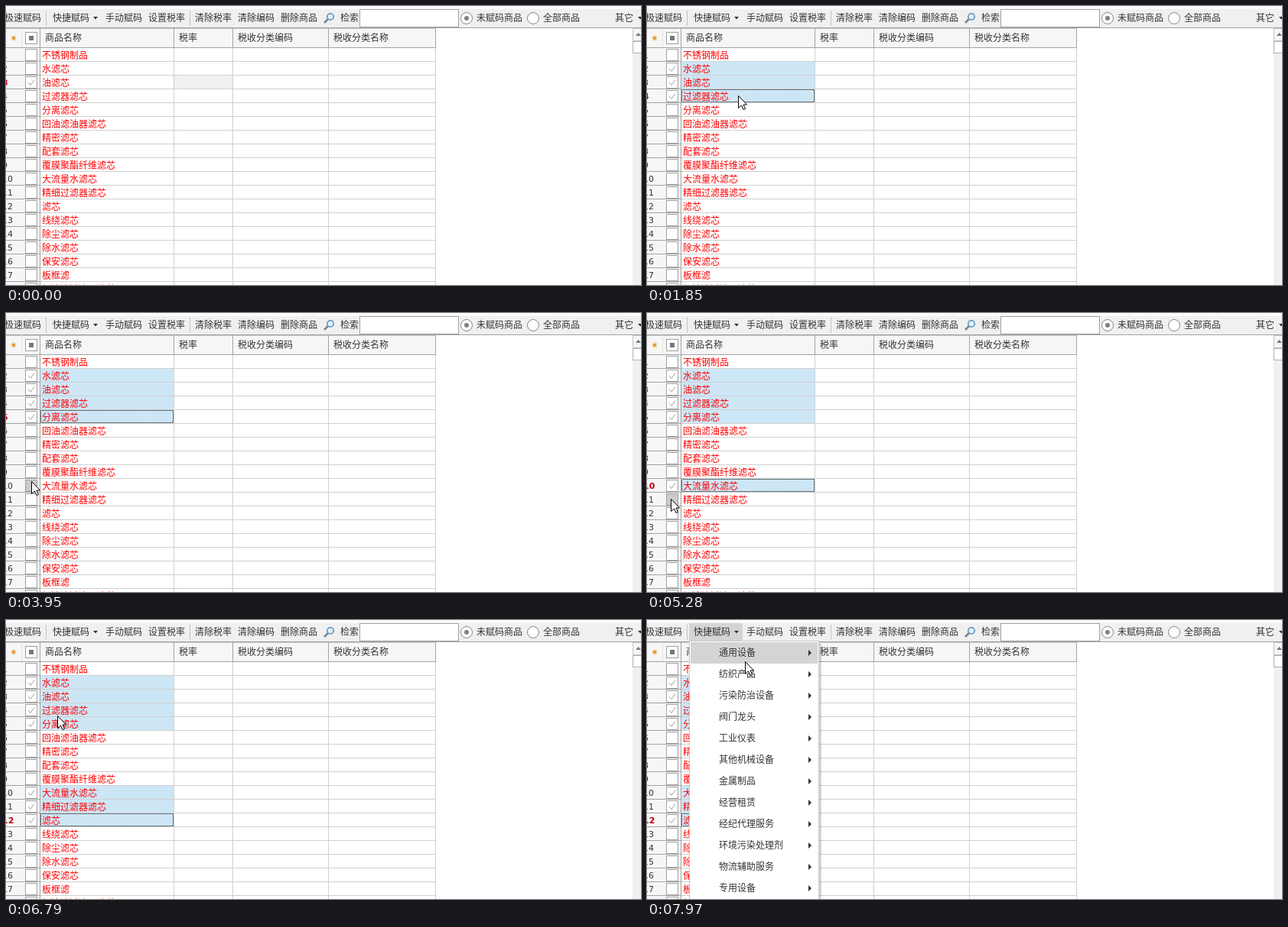
An HTML page with a canvas that plays this animation: 830x365 px, repeating every 8 s.

```html
<!DOCTYPE html>
<html lang="zh">
<head>
<meta charset="utf-8">
<style>
html, body { margin: 0; width: 100%; height: 100%; overflow: hidden; background: #fff; }
canvas { display: block; }
</style>
</head>
<body>
<canvas id="stage" width="830" height="365"></canvas>
<script>
const ctx = document.getElementById('stage').getContext('2d');
const LOOP = 8000, STEP = 70, ROW = 18, TOP = 55, RIGHT = 561;
const FONT = '12px "Noto Sans CJK SC", "Noto Sans CJK", sans-serif';
const LINE = '#d0d0d0', EDGE = '#a3a3a3', INK = '#333';

const products = ['不锈钢制品', '水滤芯', '油滤芯', '过滤器滤芯', '分离滤芯', '回油滤油器滤芯',
  '精密滤芯', '配套滤芯', '覆膜聚酯纤维滤芯', '大流量水滤芯', '精细过滤器滤芯', '滤芯',
  '线绕滤芯', '除尘滤芯', '除水滤芯', '保安滤芯', '板框滤', '机油滤过滤器滤芯'];
const menu = ['通用设备', '纺织产品', '污染防治设备', '阀门龙头', '工业仪表', '其他机械设备',
  '金属制品', '经营租赁', '经纪代理服务', '环境污染处理剂', '物流辅助服务', '专用设备'];
const columns = { 商品名称: 44, 税率: 219, 税收分类编码: 296, 税收分类名称: 421 };
const tools = { 极速赋码: -2, 快捷赋码: 61, 手动赋码: 130, 设置税率: 186, 清除税率: 247,
  清除编码: 303, 删除商品: 359, 检索: 437, 未赋码商品: 615, 全部商品: 702, 其它: 796 };

// Pointer moves: start, end, x, y
const moves = [
  [130, 900, 112, 105],
  [970, 1310, 121, 87],
  [1510, 2130, 118, 147],
  [2460, 2670, 45, 199],
  [2740, 2810, 33, 220],
  [4870, 5280, 31, 246],
  [5630, 6040, 30, 262],
  [6300, 6790, 67, 125],
  [6860, 7070, 92, 34],
  [7140, 7400, 100, 14],
  [7470, 7970, 129, 55]
];
const DRAG = 1510, CLICKS = [4870, 5630, 6300], OPEN = 7440;

function pointer(t) {
  let x = 795, y = 382;
  for (const [start, end, toX, toY] of moves) {
    if (t < start) break;
    const u = Math.min(1, (Math.floor((t - start) / STEP) + 1) * STEP / (end - start + STEP));
    x += (toX - x) * u;
    y += (toY - y) * u;
  }
  return [Math.round(x), Math.round(y)];
}

// A drag picks rows 2 to 6, then each click adds one from row 10 on
function selection(t) {
  if (t < DRAG) return { rows: [], focus: 3 };
  const y = pointer(Math.min(t, 2130))[1];
  const rows = [];
  for (let r = 2; r <= Math.floor((y - TOP) / ROW) + 1; r++) rows.push(r);
  CLICKS.forEach((at, i) => { if (t >= at) rows.push(10 + i); });
  return { rows, focus: rows[rows.length - 1] };
}

function rect(x, y, w, h, color) {
  ctx.fillStyle = color;
  ctx.fillRect(x, y, w, h);
}

function frame(x, y, w, h, fill, edge) {
  rect(x, y, w, h, edge);
  rect(x + 1, y + 1, w - 2, h - 2, fill);
}

function text(s, x, y, color = INK, font = FONT) {
  ctx.font = font;
  ctx.fillStyle = color;
  ctx.fillText(s, x, y);
}

// Draws an SVG path at x, y
function shape(d, x, y, fill, edge, width = 1) {
  const path = new Path2D(d);
  ctx.save();
  ctx.translate(x, y);
  ctx.fillStyle = fill;
  ctx.strokeStyle = edge;
  ctx.lineWidth = width;
  if (fill) ctx.fill(path);
  if (edge) ctx.stroke(path);
  ctx.restore();
}

function circle(x, y, r, fill, edge, width) {
  shape(`M${-r} 0a${r} ${r} 0 1 0 ${2 * r} 0a${r} ${r} 0 1 0 ${-2 * r} 0z`, x, y, fill, edge, width);
}

function toolbar(active) {
  rect(0, 0, 830, 4, '#fbfbfb');
  rect(0, 4, 830, 24, '#f0f0f0');
  rect(0, 28, 830, 1, EDGE);
  if (active) rect(55, 4, 70, 24, '#d4d4d4');
  [52, 240].forEach(x => rect(x, 6, 1, 20, '#c4c4c4'));
  [114, 826].forEach(x => shape('M0 0h6l-3 3.5z', x, 14, INK));
  [602, 689].forEach(x => circle(x, 16, 7.5, '#fff', '#888'));
  circle(602, 16, 3, '#808080');
  frame(462, 4, 130, 24, '#fff', '#a0a0a0');
  for (const s in tools) text(s, tools[s], 20);
  shape('M0 0l5-5', 416, 22, null, '#71879b', 2.6);
  circle(424, 14, 4.2, '#e2f1fb', '#6a9cc4', 1.8);
}

function header() {
  rect(0, 29, RIGHT, 25, '#f6f6f6');
  rect(0, 29, RIGHT, 1, '#c4c4c4');
  rect(0, 54, RIGHT + 1, 1, EDGE);
  rect(20, 29, 1, 25, '#e2e2e2');
  rect(RIGHT, 29, 1, 26, EDGE);
  for (const s in columns) {
    rect(columns[s], 29, 1, 26, EDGE);
    text(s, columns[s] + 7, 46);
  }
  shape('M-4 0h8M0-4v8M-3-3l6 6M-3 3l6-6', 10, 42, null, '#eab672');
  circle(10, 42, 2, '#e8932b');
  frame(25, 34, 16, 16, '#fff', '#a0a0a0');
  rect(30, 39, 6, 6, '#777');
}

function row(r, sel, [px, py]) {
  const y = TOP + (r - 1) * ROW;
  const picked = sel.rows.includes(r), focused = sel.focus === r;
  rect(0, y, 44, 17, '#f6f6f6');
  rect(0, y + 17, 44, 1, EDGE);
  rect(45, y + 17, RIGHT - 44, 1, LINE);
  if (picked) rect(45, y, 174, 17, '#cde6f6');
  else if (focused) rect(220, y, 76, 17, '#f0f0f0');
  text(r, -5, y + 13, focused ? '#c40010' : INK,
    (focused ? 'bold ' : '') + '11px "DejaVu Sans", sans-serif');

  const hover = px >= 25 && px < 41 && py > y && py < y + 17;
  frame(25, y + 1, 16, 16, hover ? '#cbcbcb' : '#fff', '#a0a0a0');
  if (picked || focused) shape('M0 0l3 3.5 5-7', 29, y + 9, null, '#a0a0a0');
  text(products[r - 1], 47, y + 14, '#f00');
  if (picked && focused) {
    ctx.setLineDash([1, 1]);
    ctx.lineDashOffset = 0.5;
    ctx.strokeStyle = '#000';
    ctx.strokeRect(45.5, y + 0.5, 173, 16);
    ctx.setLineDash([]);
  }
}

function scrollbar() {
  rect(819, 29, 11, 336, '#f0f0f0');
  frame(819, 29, 16, 17, '#f6f6f6', '#c4c4c4');
  shape('M0 0h7l-3.5-4z', 823, 39, '#777');
  frame(819, 46, 16, 16, '#fff', '#b0b0b0');
}

function dropdown(hover) {
  rect(225, 31, 3, 334, 'rgba(0,0,0,.16)');
  frame(55, 27, 170, 345, '#fff', '#c8c8c8');
  if (hover) rect(57, 29, 166, 28, '#d4d4d4');
  menu.forEach((s, i) => {
    const y = 43 + 28 * i;
    text(s, 94, y + 4);
    shape('M0-4l4 4-4 4z', 211, y, INK);
  });
}

function draw(t) {
  const [x, y] = pointer(t), sel = selection(t), open = t >= OPEN;
  rect(0, 0, 830, 365, '#fff');
  products.forEach((_, i) => row(i + 1, sel, [x, y]));
  [...Object.values(columns), RIGHT].forEach((cx, i) => rect(cx, TOP, 1, 310, i ? LINE : EDGE));
  header();
  scrollbar();
  toolbar(open || (x >= 55 && x < 125 && y < 28));
  if (open) dropdown(y >= 29);
  if (t >= moves[0][0]) shape('M0 0v16l4-3.5 2.5 5.5 2.5-1-2.5-5.5H11z', x + 0.5, y + 0.5, '#fff', '#000');
}

function tick() {
  draw(performance.now() % LOOP);
  requestAnimationFrame(tick);
}
tick();
</script>
</body>
</html>
```
